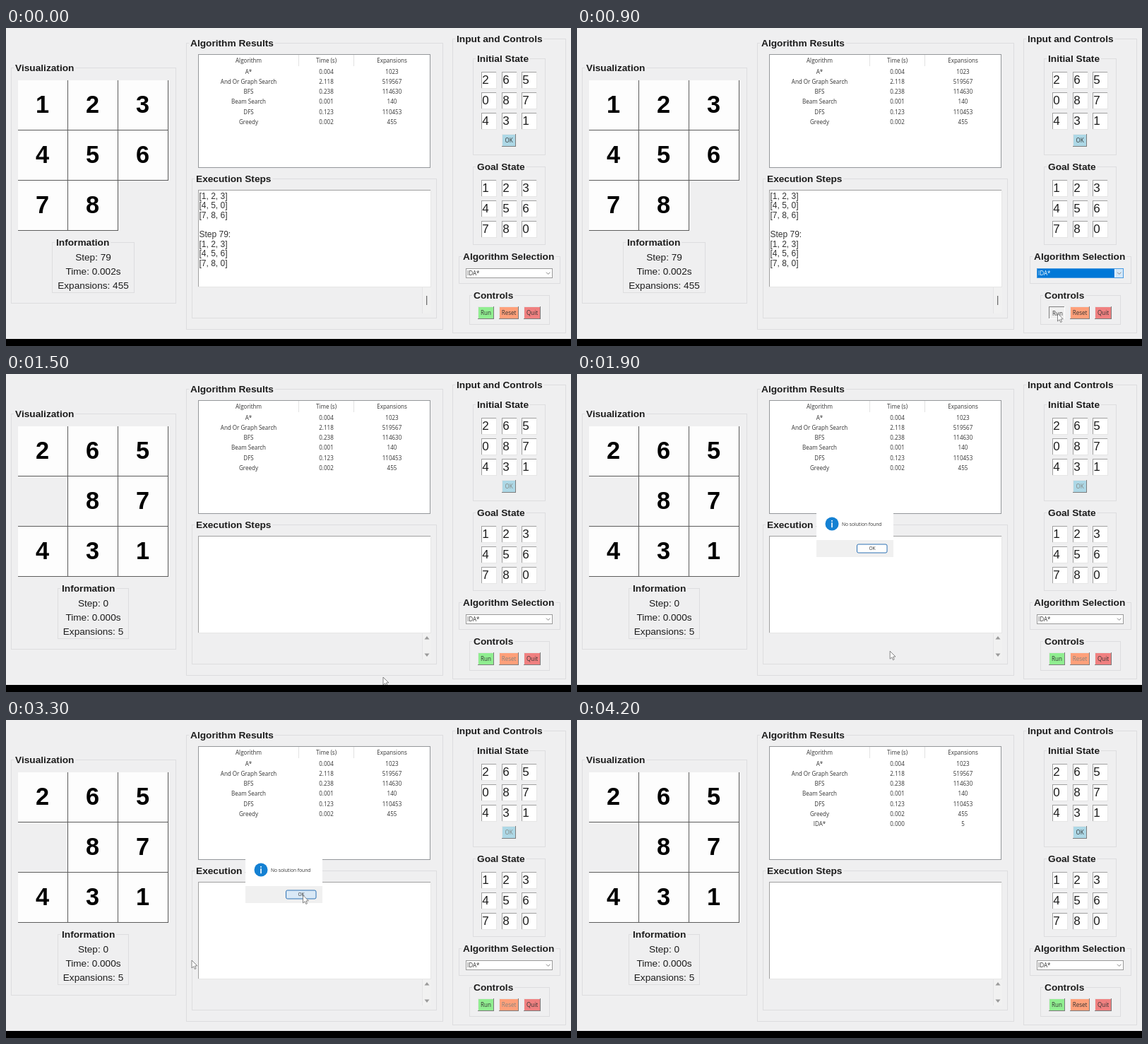
Recreate the animation shown at these times as an HTML page with a canvas. Size 800 by 450 pixels, loop 4.3 s.

```html
<!DOCTYPE html>
<html lang="en">
<head>
<meta charset="utf-8">
<title>8-puzzle solver</title>
<style>
html, body { margin: 0; width: 100%; height: 100%; overflow: hidden; background: #efeff0; }
canvas { display: block; }
</style>
</head>
<body>
<canvas id="stage" width="800" height="450"></canvas>
<script>
const ctx = document.getElementById('stage').getContext('2d');
const LOOP = 4300, STEP = 100;
const SANS = '"Liberation Sans", Arial, sans-serif';
const UI = '"Open Sans", "Noto Sans", sans-serif';
const BG = '#efeff0', INK = '#1c1c1c', SOFT = '#333';

const START = '265087431', GOAL = '123456780';
const RESULTS = [
  ['A*', '0.004', '1023'],
  ['And Or Graph Search', '2.118', '519567'],
  ['BFS', '0.238', '114630'],
  ['Beam Search', '0.001', '140'],
  ['DFS', '0.123', '110453'],
  ['Greedy', '0.002', '455'],
  ['IDA*', '0.000', '5'],
];
const LOG = ['[1, 2, 3]', '[4, 5, 0]', '[7, 8, 6]', '', 'Step 79:', '[1, 2, 3]', '[4, 5, 6]', '[7, 8, 0]'];

// Moments (ms) at which the interface changes
const FOCUS = 700, PRESS = 900, RELEASE = 1000, DIALOG = 1900, HOVER = 3200, CLOSE = 3500;

// Pointer path: time, x, y
const PATH = [
  [700, 767, 348], [900, 680.5, 404], [1200, 672, 407], [1500, 534, 429], [1600, 530, 428],
  [1800, 470, 398], [2400, 309, 363], [2500, 309, 363], [2700, 263, 340], [3100, 263, 340],
  [3200, 420.5, 248], [3400, 420.5, 248], [3800, 540, 441],
];

function rect(x, y, w, h, color) {
  ctx.fillStyle = color;
  ctx.fillRect(x, y, w, h);
}

function frame(x, y, w, h, color) {
  ctx.strokeStyle = color;
  ctx.lineWidth = 1;
  ctx.strokeRect(x + .5, y + .5, w - 1, h - 1);
}

// y is the middle of the capital letters
function text(str, x, y, size, { family = SANS, bold = false, align = 'left', color = INK } = {}) {
  ctx.font = `${bold ? 'bold ' : ''}${size}px ${family}`;
  ctx.textAlign = align;
  ctx.fillStyle = color;
  ctx.fillText(str, x, y + size * .355);
}

function label(str, x, y, color = SOFT, size = 8.05) {
  text(str, x, y, size, { family: UI, align: 'center', color });
}

function polygon(points, fill, stroke) {
  ctx.beginPath();
  points.forEach(([x, y]) => ctx.lineTo(x, y));
  ctx.closePath();
  ctx.fillStyle = fill;
  ctx.fill();
  if (stroke) {
    ctx.strokeStyle = stroke;
    ctx.lineWidth = .8;
    ctx.stroke();
  }
}

function group(title, x, y, right, bottom) {
  frame(x, y, right - x, bottom - y, '#dddddf');
  ctx.font = `bold 13.7px ${SANS}`;
  rect(x + 4, y - 7, ctx.measureText(title).width + 4, 15, BG);
  text(title, x + 6, y, 13.7, { bold: true });
}

function bevel(x, y, w, h, light, dark) {
  rect(x, y, w, 1, light);
  rect(x, y, 1, h, light);
  rect(x, y + h - 1, w, 1, dark);
  rect(x + w - 1, y, 1, h, dark);
}

function field(x, y, w, h) {
  rect(x, y, w, h, '#fff');
  bevel(x, y, w, h, '#a0a0a0', '#e6e6e6');
}

function button(str, x, y, w, color, { pressed = false, disabled = false } = {}) {
  const h = 18, d = pressed ? 1 : 0;
  rect(x, y, w, h, pressed ? '#f0f0f0' : color);
  bevel(x, y, w, h, pressed ? '#808080' : '#e6e6e6', pressed ? '#fff' : '#7c7c7c');
  label(str, x + w / 2 + d, y + h / 2 + d, disabled ? '#83837f' : SOFT);
}

function board(tiles) {
  ctx.save();
  ctx.beginPath();
  ctx.rect(17, 74, 213, 213);
  ctx.clip();
  [...tiles].forEach((digit, i) => {
    if (digit === '0') return;
    const x = 16 + 71 * (i % 3), y = 73 + 71 * Math.floor(i / 3);
    rect(x, y, 72, 72, '#fdfdfd');
    frame(x, y, 72, 72, '#5c5c5c');
    text(digit, x + 35.5, y + 35, 34.3, { bold: true, align: 'center', color: '#000' });
  });
  ctx.restore();
}

function entries(digits, top) {
  [...digits].forEach((digit, i) => {
    const x = 673 + Math.round(28.6 * (i % 3)), y = top + 29 * Math.floor(i / 3);
    field(x, y, 22, 24);
    text(digit, x + 1.3, y + 10.8, 17);
  });
}

function information(lines, x, right) {
  group('Information', x, 303, right, 375);
  lines.forEach((line, i) => text(line, 123.5, 323.7 + 20 * i, 13.6, { align: 'center' }));
}

function table(rows) {
  rect(272, 37, 329, 161, '#fff');
  frame(272, 37, 329, 161, '#94979a');
  rect(414, 38, 1, 16, '#e2e2e2');
  rect(492, 38, 1, 16, '#e2e2e2');
  [['Algorithm', 'Time (s)', 'Expansions'], ...rows].forEach((row, i) => {
    const y = i ? 47.7 + 14.2 * i : 46.3;
    row.forEach((cell, col) => label(cell, [343.5, 453.5, 546.5][col], y));
  });
}

function steps(lines) {
  field(272, 229, 330, 138);
  lines.forEach((line, i) => text(line, 273.5, 237.6 + 13.55 * i, 12, { color: SOFT }));
  rect(589, 367, 1, 37, '#e4e4e5');
  rect(590, 367, 12, 37, '#f1f1f1');
  if (lines.length) {
    rect(595, 379, 1.3, 13, '#707070');
  } else {
    polygon([[592.5, 375.5], [596, 371], [599.5, 375.5]], '#9a9a9a');
    polygon([[592.5, 395.5], [596, 400], [599.5, 395.5]], '#9a9a9a');
  }
}

function combobox(focused) {
  rect(651, 340, 123, 14, '#fff');
  if (focused) {
    rect(652, 341, 109, 12, '#0078d7');
    rect(762, 341, 11, 12, '#d5e8f8');
  }
  frame(651, 340, 123, 14, focused ? '#4a9be0' : '#9a9a9a');
  text('IDA*', 653, 347, 8.1, { family: UI, color: focused ? '#fff' : SOFT });
  ctx.beginPath();
  ctx.moveTo(765, 345.7);
  ctx.lineTo(767.7, 348.4);
  ctx.lineTo(770.4, 345.7);
  ctx.strokeStyle = '#777';
  ctx.lineWidth = .9;
  ctx.stroke();
}

function dialog(hovered) {
  rect(339, 196, 109, 63, '#fff');
  rect(339, 235, 109, 24, '#f0f0f0');
  ctx.beginPath();
  ctx.arc(361, 212, 9.5, 0, 2 * Math.PI);
  ctx.fillStyle = '#1581d3';
  ctx.fill();
  rect(360.2, 207, 1.6, 1.8, '#fff');
  rect(360.2, 210.2, 1.6, 7, '#fff');
  text('No solution found', 375, 212.3, 6.7, { family: UI, color: SOFT });
  ctx.beginPath();
  ctx.roundRect(396.5, 241, 42.5, 12, 2);
  ctx.fillStyle = hovered ? '#d9e8f6' : '#fdfdfd';
  ctx.fill();
  ctx.strokeStyle = '#2f73b5';
  ctx.lineWidth = 1;
  ctx.stroke();
  label('OK', 418, 247, SOFT, 6.6);
}

function arrow(x, y) {
  const shape = [[0, 0], [0, 11], [2.6, 8.7], [4.3, 12.5], [6, 11.7], [4.4, 8], [7.8, 7.8]];
  polygon(shape.map(([dx, dy]) => [x + dx, y + dy]), '#fff', '#666');
}

function pointer(t) {
  const i = PATH.findIndex(([time]) => time > t);
  if (i < 1) return;
  const [t0, x0, y0] = PATH[i - 1], [t1, x1, y1] = PATH[i];
  const k = (t - t0) / (t1 - t0);
  arrow(x0 + (x1 - x0) * k, y0 + (y1 - y0) * k);
}

function draw(t) {
  const started = t >= RELEASE, closed = t >= CLOSE;
  const locked = { disabled: started && !closed };

  rect(0, 0, 800, 450, BG);

  group('Visualization', 7, 56, 241, 390);
  board(started ? START : GOAL);
  if (started) information(['Step: 0', 'Time: 0.000s', 'Expansions: 5'], 73, 174);
  else information(['Step: 79', 'Time: 0.002s', 'Expansions: 455'], 65, 182);

  group('Algorithm Results', 255, 21, 619, 427);
  table(RESULTS.slice(0, closed ? 7 : 6));
  group('Execution Steps', 263, 213, 610, 411);
  steps(started ? [] : LOG);

  group('Input and Controls', 632, 15, 793, 432);
  group('Initial State', 661, 43, 764, 180);
  entries(START, 62);
  button('OK', 702, 150, 20, '#add8e6', locked);
  group('Goal State', 661, 196, 764, 307);
  entries(GOAL, 215);
  group('Algorithm Selection', 641, 323, 785, 362);
  combobox(t >= FOCUS && t < RELEASE);
  group('Controls', 656, 378, 770, 420);
  button('Run', 668, 394, 23, '#90ee90', { pressed: t >= PRESS && !started });
  button('Reset', 698, 394, 28, '#ffa07a', locked);
  button('Quit', 733, 394, 24, '#f08080');

  if (t >= DIALOG && !closed) dialog(t >= HOVER);
  if (t >= HOVER && !closed) arrow(263, 340);
  pointer(t);
  rect(0, 440, 800, 10, '#000');
}

function tick() {
  const t = performance.now() % LOOP;
  draw(Math.floor(t / STEP) * STEP);
  requestAnimationFrame(tick);
}
tick();
</script>
</body>
</html>
```
